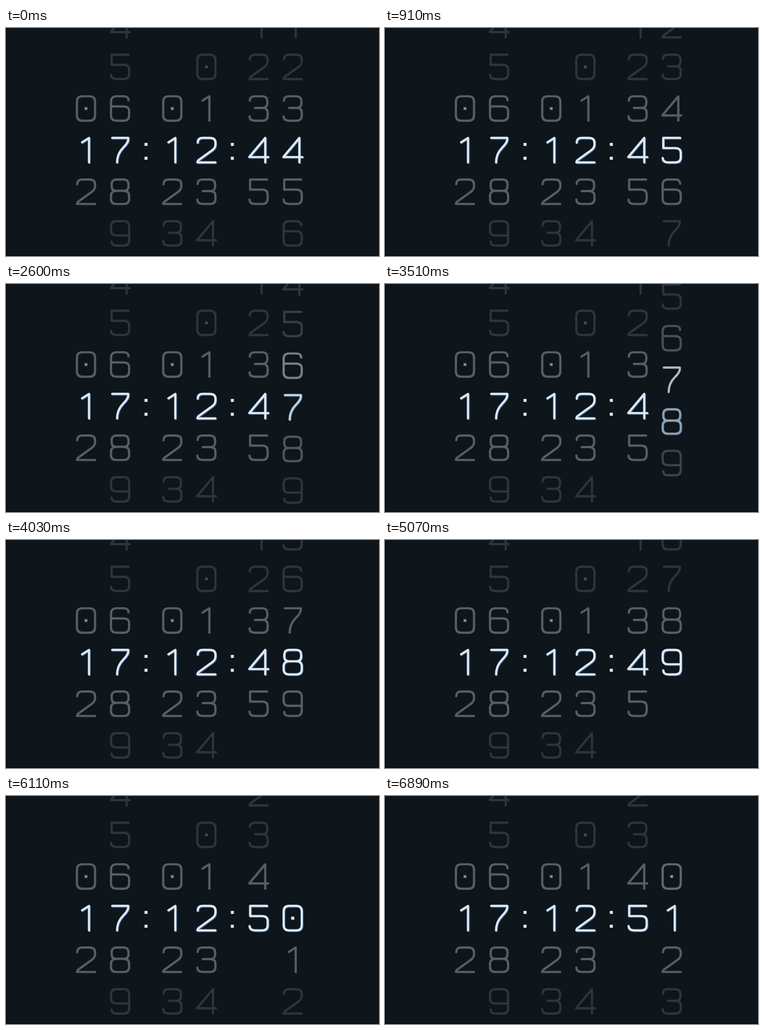
An HTML page with a canvas that plays this animation: 618 px wide and 379 px high, repeating every 7.02 s.

```html
<!DOCTYPE html>
<html lang="en">
<head>
<meta charset="utf-8">
<title>Sliding clock</title>
<style>
  html, body { margin: 0; width: 618px; height: 379px; overflow: hidden; background: #0e151b; }
  canvas { display: block; }
</style>
</head>
<body>
<canvas id="stage" width="618" height="379"></canvas>
<script>
const ctx = document.getElementById('stage').getContext('2d');

const LOOP = 7020, FRAME = 130, TICK = 1040, FIRST_TICK = 390;
const ROW = 69.2, MID = 203;
const INK = '#e0e9f1', SHADOW = '#336699';

// Stroke outlines, centred on the middle of each digit
const glyphs = [
  'M-6 -20.3H6Q15 -20.3 15 -11.5V11.5Q15 20.3 6 20.3H-6Q-15 20.3 -15 11.5V-11.5Q-15 -20.3 -6 -20.3ZM-.4 0H.4',
  'M-6.5 -13L5 -20.3V20.3',
  'M-14.5 -12.5Q-14.5 -20.3 -6 -20.3H6Q15 -20.3 15 -12V-9Q15 -4 9.5 .3L-13 16.5Q-15 18 -15 20.3H15',
  'M-14.5 -13Q-14.5 -20.3 -6 -20.3H6Q14.5 -20.3 14.5 -12V-9Q14.5 -1 7 -1H-6M7 -1Q15 -1 15 7V12Q15 20.3 6 20.3H-6Q-15 20.3 -15 13',
  'M11 20.3V-20.3L-15.5 11.5H16',
  'M14 -20.3H-14V-3.5H6Q15 -3.5 15 5V11.5Q15 20.3 6 20.3H-6Q-15 20.3 -15 13',
  'M14 -13.5Q14 -20.3 6 -20.3H-6Q-15 -20.3 -15 -11.5V11.5Q-15 20.3 -6 20.3H6Q15 20.3 15 11.5V5Q15 -3.5 6 -3.5H-15',
  'M-13 -20.3H13.5V-17.5Q13 -12 5 -4Q-5 6 -5 20.3',
  'M-6 -20.3H6Q14 -20.3 14 -12V-9Q14 -1.5 6 -1.5H-6Q-14 -1.5 -14 -9V-12Q-14 -20.3 -6 -20.3ZM-6 -1.5H6Q15 -1.5 15 7V12Q15 20.3 6 20.3H-6Q-15 20.3 -15 12V7Q-15 -1.5 -6 -1.5Z',
  'M-14 13.5Q-14 20.3 -6 20.3H6Q15 20.3 15 11.5V-11.5Q15 -20.3 6 -20.3H-6Q-15 -20.3 -15 -11.5V-5Q-15 3.5 -6 3.5H15'
].map(d => new Path2D(d));

// Centre and number of digits of each column
const columns = [[132.5, 3], [189, 10], [275.5, 6], [332, 10], [418.5, 6], [475, 10]];
const fade = [1, .35, .15, .15, .1, .1, .1];
const opacity = distance => fade[Math.abs(distance)] ?? .025;
const mix = (a, b, p) => a + (b - a) * p;

// cubic-bezier(.25, .1, .25, 1)
function ease(x) {
  if (x >= 1) return 1;
  let lo = 0, hi = 1, u = .5;
  for (let i = 0; i < 20; i++) {
    u = (lo + hi) / 2;
    const at = .75 * u * (1 - u) ** 2 + .75 * u * u * (1 - u) + u ** 3;
    if (at < x) lo = u; else hi = u;
  }
  return .3 * u * (1 - u) ** 2 + 3 * u * u * (1 - u) + u ** 3;
}

function drawDigit(digit, x, y, alpha, lit) {
  const stroke = (color, shift) => {
    ctx.setTransform(1, 0, 0, 1, x + shift, y + shift);
    ctx.strokeStyle = color;
    ctx.stroke(glyphs[digit]);
  };
  ctx.globalAlpha = alpha;
  if (lit) stroke(SHADOW, 1);
  stroke(INK, 0);
  if (digit === 0) {
    ctx.fillStyle = INK;
    ctx.fillRect(-2.5, -2.5, 5, 5);
  }
}

function drawColumn([x, count], from, to, slide, blend) {
  const pos = mix(from, to, slide);
  for (let d = 0; d < count; d++) {
    const y = MID + (d - pos) * ROW;
    if (y < -30 || y > 410) continue;
    drawDigit(d, x, y, mix(opacity(d - from), opacity(d - to), blend), d === to);
  }
}

function draw(time) {
  const t = Math.floor(time % LOOP / FRAME) * FRAME;
  const tick = Math.floor((t - FIRST_TICK) / TICK);
  const elapsed = (t - FIRST_TICK - tick * TICK) * .96 + 110;
  const slide = ease(elapsed / 300), blend = ease(elapsed / 500);
  const digits = seconds => [1, 7, 1, 2, Math.floor(seconds / 10), seconds % 10];
  const from = digits(44 + tick), to = digits(45 + tick);

  ctx.setTransform(1, 0, 0, 1, 0, 0);
  ctx.globalAlpha = 1;
  ctx.fillStyle = '#0e151b';
  ctx.fillRect(0, 0, 618, 379);
  ctx.fillStyle = '#04070a';
  ctx.fillRect(0, 0, 1, 379);
  ctx.fillRect(0, 378, 618, 1);

  ctx.fillStyle = INK;
  for (const x of [232, 375])
    for (const y of [193.5, 216.5]) ctx.fillRect(x - 2.5, y - 2.5, 5, 5);

  ctx.lineWidth = 3.7;
  ctx.lineCap = ctx.lineJoin = 'round';
  columns.forEach((column, i) => drawColumn(column, from[i], to[i], slide, blend));
}

const start = performance.now();
function loop() {
  draw(performance.now() - start);
  requestAnimationFrame(loop);
}
loop();
</script>
</body>
</html>
```
